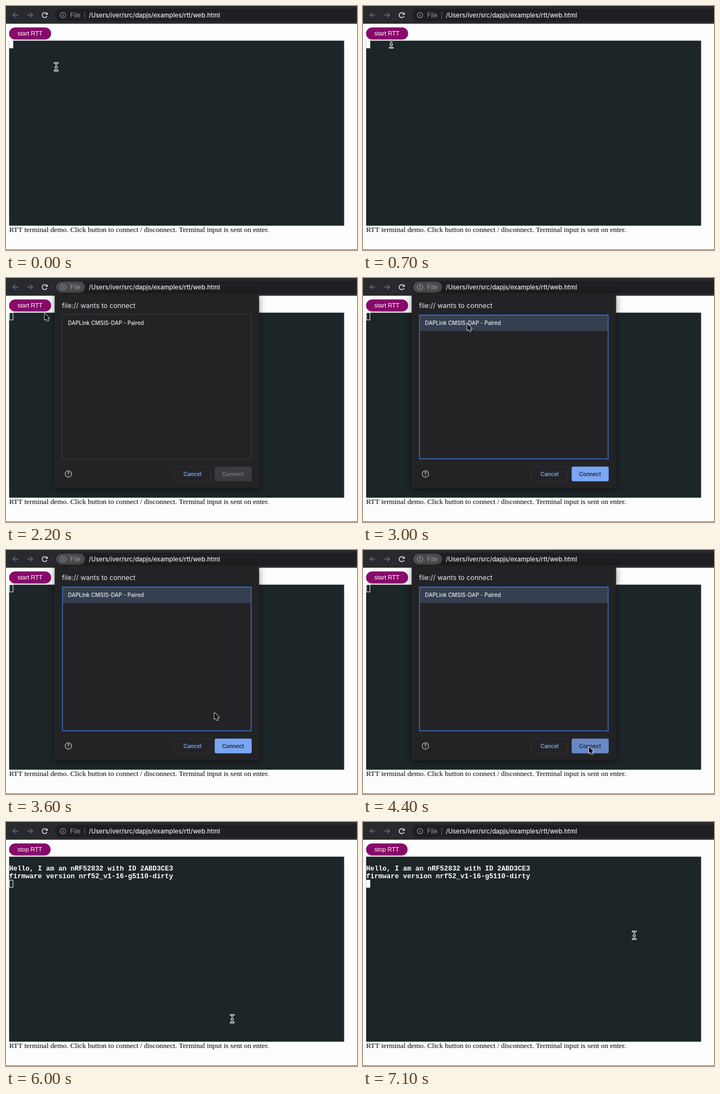
These frames come from a looping animation (640x447 px, 8 s). An HTML page with a canvas:

```html
<!DOCTYPE html>
<html lang="en">
<head>
<meta charset="utf-8">
<title>RTT terminal demo</title>
<style>
  html, body { margin: 0; width: 100%; height: 100%; overflow: hidden; background: #fdfdfd; }
  canvas { display: block; width: 640px; height: 447px; }
</style>
</head>
<body>
<canvas id="stage"></canvas>
<script>
const W = 640, H = 447, LOOP = 8000, STEP = 100;
const UI = 'Inter, Roboto, sans-serif';
const MONO = '"Liberation Mono", "DejaVu Sans Mono", monospace';
const TERM = { x: 5.7, y: 63.5, w: 610.8, h: 339, cellW: 7.475, cellH: 14.125 };
const AT = { blur: 1300, open: 1600, select: 3000, press: 4300, close: 4500,
             running: 5800, output: 5900, focus: 6900 };
// time, x, y of the mouse
const MOUSE = [
  [0, 91, 111], [1100, 34, 51], [1900, 34, 51], [2200, 70.5, 65], [2700, 190, 84],
  [3100, 190, 84], [3600, 380, 298], [4100, 412, 360.5], [6200, 412, 360.5], [6600, 494, 207]
];

const canvas = document.getElementById('stage');
const ctx = canvas.getContext('2d');
const dpr = window.devicePixelRatio || 1;
canvas.width = W * dpr;
canvas.height = H * dpr;

function rect(x, y, w, h, color) {
  ctx.fillStyle = color;
  ctx.fillRect(x, y, w, h);
}

function round(x, y, w, h, r, fill, stroke, line = 1) {
  ctx.beginPath();
  ctx.roundRect(x, y, w, h, r);
  if (fill) { ctx.fillStyle = fill; ctx.fill(); }
  if (stroke) { ctx.strokeStyle = stroke; ctx.lineWidth = line; ctx.stroke(); }
}

function text(str, x, y, font, color, align = 'left') {
  ctx.font = font;
  ctx.fillStyle = color;
  ctx.textAlign = align;
  ctx.fillText(str, x, y);
}

function lines(color, width, ...paths) {
  ctx.strokeStyle = color;
  ctx.lineWidth = width;
  ctx.beginPath();
  for (const p of paths)
    for (let i = 0; i < p.length; i += 2) ctx[i ? 'lineTo' : 'moveTo'](p[i], p[i + 1]);
  ctx.stroke();
}

function ring(x, y, r, color, width, from = 0, to = Math.PI * 2) {
  ctx.strokeStyle = color;
  ctx.lineWidth = width;
  ctx.beginPath();
  ctx.arc(x, y, r, from, to);
  ctx.stroke();
}

function toolbar(active) {
  rect(0, 0, W, 32.5, '#292a2e');
  rect(351, 0, 150, 1, '#131416');
  round(89, 5, W, 23, 11.5, '#1e1f22');
  lines('#6d7074', 1.3, [22.5, 16.5, 12.5, 16.5], [17, 12, 12.5, 16.5, 17, 21]);
  lines('#6d7074', 1.3, [38.5, 16.5, 48.5, 16.5], [44, 12, 48.5, 16.5, 44, 21]);
  ring(70.5, 16.8, 4.5, '#e4e6e9', 1.5, 0.35, 5.5);
  ctx.fillStyle = '#e4e6e9';
  ctx.beginPath();
  ctx.moveTo(76, 11.5);
  ctx.lineTo(76, 16);
  ctx.lineTo(71.5, 16);
  ctx.fill();

  if (active) round(91, 6.5, 53, 20.5, 10.25, '#4a4b4e');
  else rect(143, 10, 1, 13, '#5b5d61');
  ring(104, 16.8, 5, '#9a9da2', 1.1);
  rect(103.4, 16, 1.2, 3.6, '#9a9da2');
  rect(103.4, 13.8, 1.2, 1.2, '#9a9da2');
  text('File', 117, 20.8, '11.3px ' + UI, '#9a9da2');
  text('/Users/iver/src/dapjs/examples/rtt/web.html', 151, 20.8, '500 11.25px ' + UI, '#eceef0');
}

function page(t) {
  const running = t >= AT.running;
  round(5.7, 39.2, running ? 75.6 : 76.6, 22.4, 11.2, '#870a6b');
  text(running ? 'stop RTT' : 'start RTT', 20.8, 54, '11px "Liberation Sans", Arial, sans-serif', '#fff');

  rect(TERM.x, TERM.y, TERM.w, TERM.h, '#1c2528');
  let row = 0;
  if (t >= AT.output) {
    const out = ['', 'Hello, I am an nRF52832 with ID 2ABD3CE3', 'firmware version nrf52_v1-16-g5110-dirty'];
    out.forEach((s, i) => text(s, TERM.x, TERM.y + 11.4 + i * TERM.cellH, 'bold 12.46px ' + MONO, '#fff'));
    row = out.length;
  }
  const y = Math.floor(TERM.y + row * TERM.cellH + 0.4);
  if (t < AT.blur || t >= AT.focus) rect(TERM.x, y, TERM.cellW, 14.4, '#fff');
  else round(TERM.x + 0.6, y + 0.6, TERM.cellW - 1, 13.2, 0, null, '#fff');

  text('RTT terminal demo. Click button to connect / disconnect. Terminal input is sent on enter.',
    5.8, 414, '13.29px "Liberation Serif", Times, serif', '#000');
  rect(0, 446, W, 1, '#77787a');
}

function dialog(t) {
  const selected = t >= AT.select;
  ctx.save();
  ctx.shadowColor = 'rgba(0,0,0,.45)';
  ctx.shadowBlur = 13 * dpr;
  ctx.shadowOffsetY = 2 * dpr;
  round(88.7, 29, 372.8, 356, 3, '#232326');
  ctx.restore();
  text('file:// wants to connect', 102, 55, '12.35px ' + UI, '#e8eaed');

  if (selected) {
    rect(103, 68, 344, 29, '#353f4f');
    round(103, 67.7, 344, 263.6, 0, null, '#3f73c8', 1.4);
  } else {
    round(102.5, 66.5, 345, 265.5, 0, null, '#3b3c40');
  }
  text('DAPLink CMSIS-DAP - Paired', 113, 86, '500 9.9px ' + UI, '#e8eaed');

  ring(113.8, 359, 5.9, '#bfc2c6', 1.2);
  text('?', 113.8, 362.3, '600 9px ' + UI, '#bfc2c6', 'center');
  round(306.5, 346, 67, 26, 3, null, '#303236');
  text('Cancel', 340, 362.7, '600 9.9px ' + UI, '#7ca8f3', 'center');
  const fill = !selected ? '#3a3b3f' : t < AT.press ? '#79a6f5' : '#6889c6';
  round(380.5, 345.5, 67.5, 27, 3, fill);
  text('Connect', 414, 362.7, '600 9.75px ' + UI, selected ? '#22262e' : '#797c81', 'center');
}

function mouseAt(t) {
  let a = MOUSE[0];
  for (const b of MOUSE) {
    if (t < b[0]) {
      const u = (t - a[0]) / (b[0] - a[0]);
      const e = u * u * (3 - 2 * u);
      return [a[1] + (b[1] - a[1]) * e, a[2] + (b[2] - a[2]) * e];
    }
    a = b;
  }
  return [a[1], a[2]];
}

function beam(x, y) {
  const serif = s => [-3, 7 * s, -1, 7 * s, 0, 6 * s, 1, 7 * s, 3, 7 * s];
  const shape = [serif(-1), serif(1), [0, -6, 0, 6], [-1.5, 1, 1.5, 1]];
  ctx.translate(Math.floor(x) + 0.5, Math.floor(y) + 0.5);
  ctx.lineCap = 'round';
  lines('#fff', 2.8, ...shape);
  ctx.lineCap = 'butt';
  lines('#000', 1, ...shape);
}

function arrow(x, y) {
  const p = [0, 0, 0, 12, 2.8, 9.5, 4.8, 14, 6.9, 13.1, 5, 8.8, 8.7, 8.8];
  ctx.translate(x, y);
  ctx.beginPath();
  for (let i = 0; i < p.length; i += 2) ctx.lineTo(p[i], p[i + 1]);
  ctx.closePath();
  ctx.strokeStyle = '#fff';
  ctx.lineWidth = 1.6;
  ctx.stroke();
  ctx.fillStyle = '#000';
  ctx.fill();
}

function draw(t) {
  const open = t >= AT.open && t < AT.close;
  ctx.setTransform(dpr, 0, 0, dpr, 0, 0);
  rect(0, 0, W, H, '#fdfdfd');
  page(t);
  toolbar(open);
  if (open) dialog(t);
  const [x, y] = mouseAt(t);
  ctx.save();
  ctx.lineJoin = 'round';
  if (!open && y >= TERM.y) beam(x, y);
  else arrow(x, y);
  ctx.restore();
}

const start = performance.now();
function tick() {
  const t = (performance.now() - start) % LOOP;
  draw(Math.floor(t / STEP) * STEP);
  requestAnimationFrame(tick);
}
tick();
</script>
</body>
</html>
```
